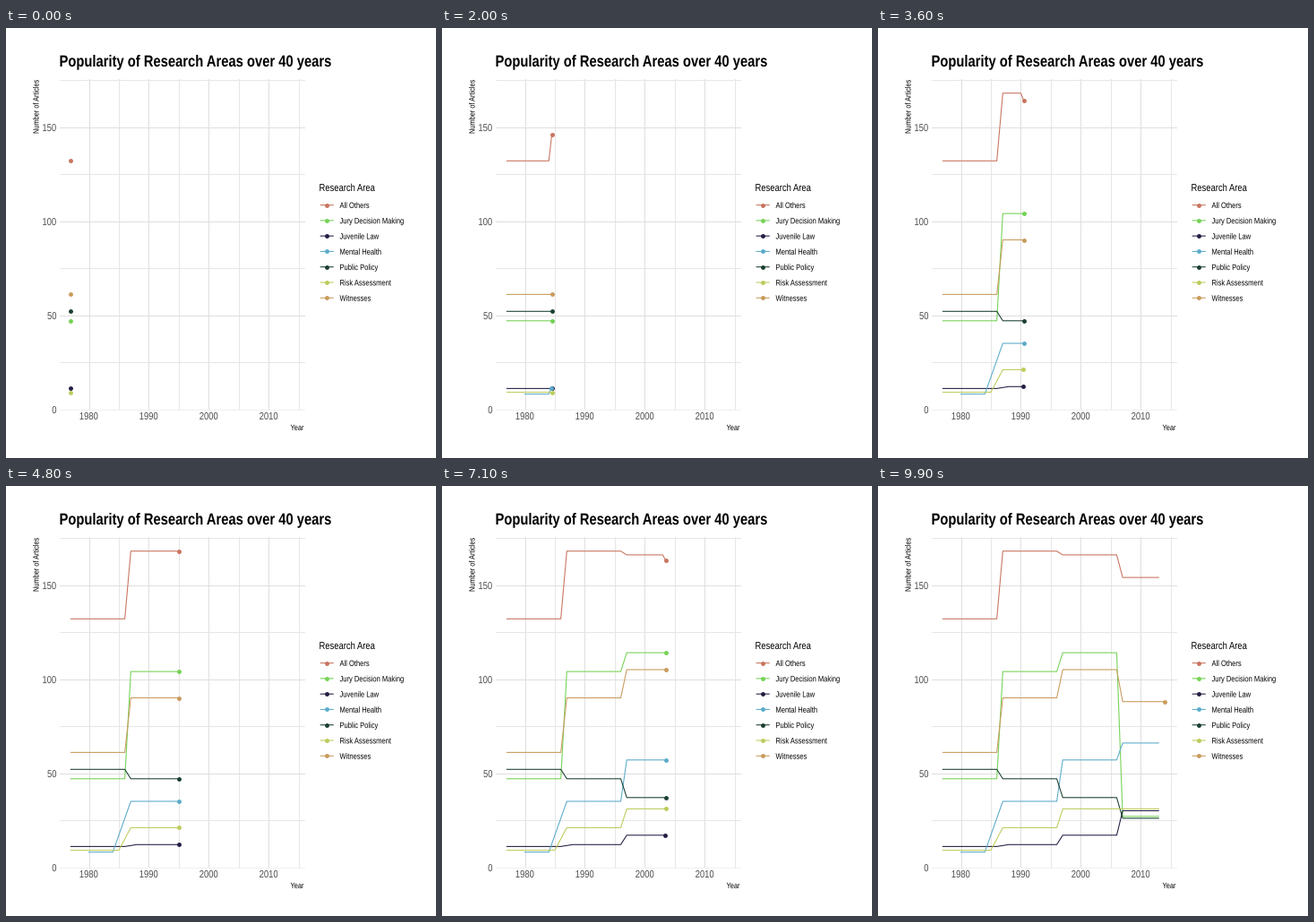
Recreate the animation shown at these times as a matplotlib script. Size 480 px wide and 480 px high, loop 10000 ms.

```python
import numpy as np
import matplotlib.pyplot as plt
from matplotlib.animation import FuncAnimation
from matplotlib.patches import PathPatch
from matplotlib.textpath import TextPath
from matplotlib.transforms import Affine2D

SIZE, DPI = 480, 100
FRAMES, INTERVAL = 100, 100
PX = 72 / DPI                  # points per pixel
FIRST, LAST = 1977, 2014
NARROW = 0.82                  # condensed face ratio
LEFT, RIGHT, TOP, BOTTOM = 60, 332.5, 57, 425.5

# name, colour, value per decade, first year, last year, years without data
SERIES = [
    ("All Others", "#c8745e", (132, 168, 166, 154), 1977, 2013, ()),
    ("Jury Decision Making", "#74d256", (47, 104, 114, 27), 1977, 2013, ()),
    ("Juvenile Law", "#221f44", (11, 12, 17, 30), 1977, 2013, (1987, 1991, 2004)),
    ("Mental Health", "#5babc9", (8, 35, 57, 66), 1980, 2013, (1985, 1986)),
    ("Public Policy", "#1b4030", (52, 47, 37, 26), 1977, 2013, ()),
    ("Risk Assessment", "#becb5b", (9, 21, 31, 31), 1977, 2013, (1986, 1991)),
    ("Witnesses", "#c99b5c", (61, 90, 105, 88), 1977, 2014, ()),
]


def px(year):
    return 92.5 + 6.69 * (year - 1980)


def py(value):
    return BOTTOM - 2.1 * value


fig = plt.figure(figsize=(SIZE / DPI, SIZE / DPI), dpi=DPI, facecolor="white")
ax = fig.add_axes([0, 0, 1, 1])
ax.set(xlim=(0, SIZE), ylim=(SIZE, 0))
ax.axis("off")


def label(x, y, text, size, color="black", weight="normal", align=0, angle=0):
    """Condensed text on baseline y; align is 0 left, 0.5 centre, 1 right."""
    font = {"family": "Liberation Sans", "weight": weight}
    path = TextPath((0, 0), text, size=size, prop=font)
    box = path.get_extents()
    shift = -align * (box.x0 + box.x1)
    move = Affine2D().translate(shift, 0).scale(NARROW, -1)
    move.rotate_deg(angle).translate(x, y)
    ax.add_patch(PathPatch(move.transform_path(path), fc=color, lw=0, zorder=5))


def stroke(xs, ys, color, width=1.07, **kw):
    return ax.plot(xs, ys, color=color, lw=width * PX, **kw)[0]


def dot(xs, ys, color, **kw):
    return ax.plot(xs, ys, "o", color=color, ms=4.9 * PX, mew=0, **kw)[0]


def draw_grid():
    for year in range(1980, 2016, 5):
        shade = "#e6e6e6" if year % 10 else "#dedede"
        stroke([px(year)] * 2, [TOP, BOTTOM], shade, 1, zorder=1)
    for value in range(0, 176, 25):
        shade = "#e6e6e6" if value % 50 else "#dedede"
        if value == 0:
            shade = "#f0f0f0"
        stroke([LEFT, RIGHT], [py(value)] * 2, shade, 1, zorder=1)


def draw_text():
    label(59.5, 43, "Popularity of Research Areas over 40 years", 18, weight="bold")
    for year in range(1980, 2011, 10):
        label(px(year), 437, str(year), 11.5, "#4d4d4d", align=0.5)
    for value in range(0, 151, 50):
        label(56.5, py(value) + 4.6, str(value), 11.5, "#4d4d4d", align=1)
    label(RIGHT, 449, "Year", 9, align=1)
    label(36.5, 118, "Number of Articles", 9, angle=-90)


def draw_legend():
    label(349.5, 182, "Research Area", 11.5)
    for i, (name, color, *_) in enumerate(SERIES):
        y = 197.6 + 17.28 * i
        stroke([351.2, 365.2], [y, y], color, snap=False)
        dot([358.2], [y], color)
        label(372.5, y + 3.4, name, 9.2)


class Trace:
    def __init__(self, color, decades, start, end, gaps):
        self.years = np.array([y for y in range(start, end + 1) if y not in gaps])
        decade = np.minimum((self.years - FIRST) // 10, 3)
        self.values = np.array(decades, float)[decade]
        # each data row sits on its nearest frame
        step = (FRAMES - 1) / (LAST - FIRST)
        self.keys = np.round((self.years - FIRST) * step).astype(int)
        self.pull = None
        self.line = stroke([], [], color, snap=False, zorder=3)
        self.head = dot([], [], color, zorder=4)

    def update(self, frame):
        n = np.searchsorted(self.keys, frame, side="right")
        xs, ys = list(px(self.years[:n])), list(py(self.values[:n]))
        alive = 0 < n and frame <= self.keys[-1]
        if alive and frame > self.keys[n - 1]:
            t = (frame - self.keys[n - 1]) / (self.keys[n] - self.keys[n - 1])
            goal = self.values[n] if self.pull is None else self.pull
            year = self.years[n - 1] + t * (self.years[n] - self.years[n - 1])
            xs.append(px(year))
            ys.append(py(self.values[n - 1] + t * (goal - self.values[n - 1])))
        self.line.set_data(xs, ys)
        self.head.set_data(xs[-1:] if alive else [], ys[-1:] if alive else [])


draw_grid()
draw_text()
draw_legend()
traces = [Trace(*row[1:]) for row in SERIES]
traces[0].pull = np.median(SERIES[0][2])  # its head leans to the median between rows


def update(frame):
    for trace in traces:
        trace.update(frame)
    return [part for trace in traces for part in (trace.line, trace.head)]


anim = FuncAnimation(fig, update, frames=FRAMES, interval=INTERVAL,
                     repeat=True, repeat_delay=0, blit=False)
plt.show()
```
